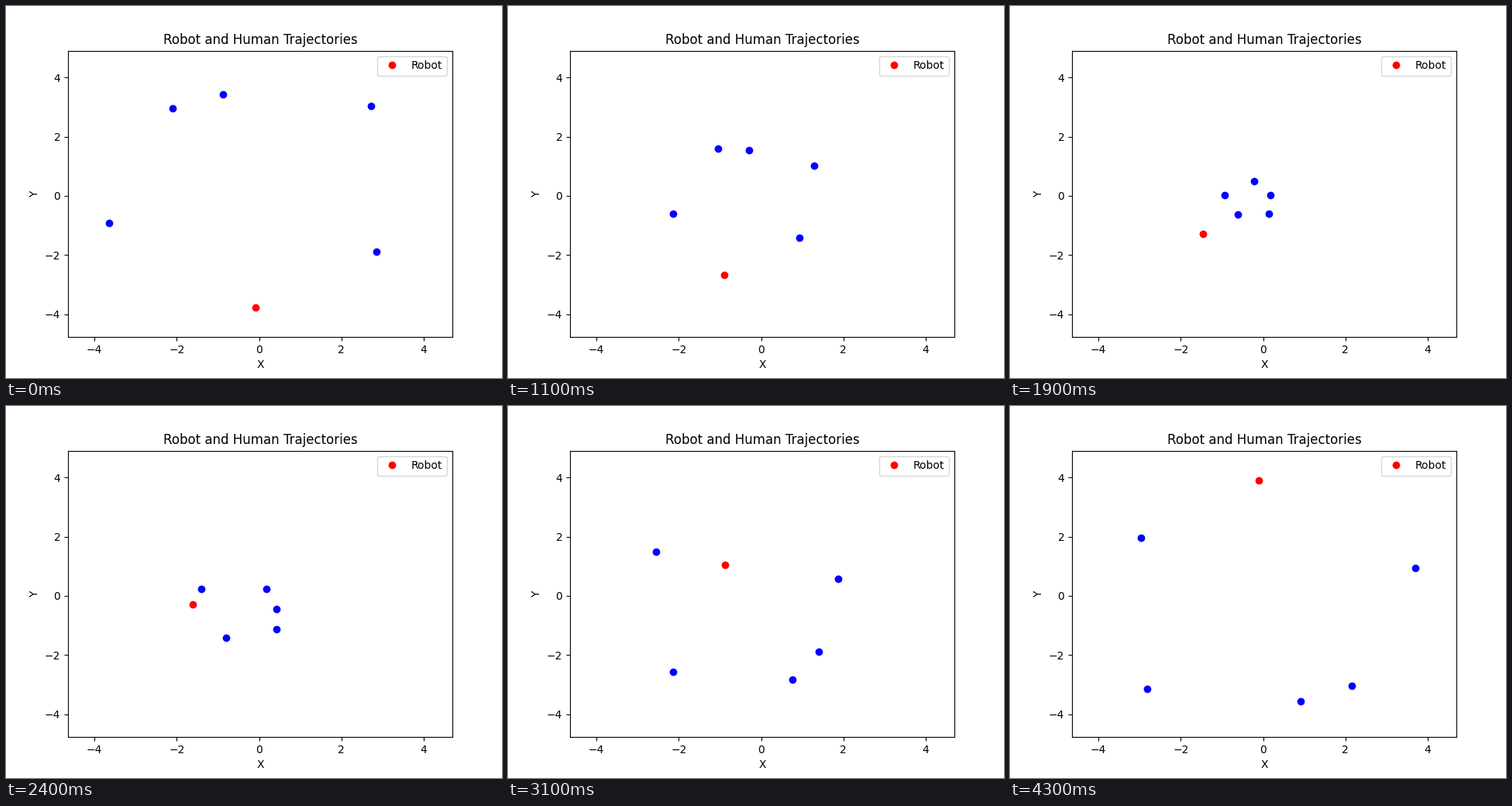
Write a matplotlib script that moves like this. It is 640x480 px and loops after 4.4 s.

```python
import numpy as np
import matplotlib.pyplot as plt
from matplotlib.animation import FuncAnimation

FRAMES = 44
STEP_MS = 100
MEET = 19          # frame at which the humans crowd together
STEP = 0.25        # full speed, in units per frame
RECOVER = 0.4      # share of lost speed regained per frame after the crowd
SAG = 0.22         # downward bow of the paths that begin in the lower half

# Each human's start and place in the crowd
HUMANS = np.array([
    [(-2.098, 2.959), (-0.215, 0.495)],
    [(-0.874, 3.431), (0.181, 0.024)],
    [(2.723, 3.038), (0.143, -0.606)],
    [(-3.642, -0.920), (-0.930, 0.024)],
    [(2.855, -1.890), (-0.610, -0.632)],
])

# Turning points of the robot: frame, x, y
ROBOT = np.array([
    (0, -0.083, -3.777), (5, -0.573, -2.624), (8, -0.836, -2.860),
    (11, -0.893, -2.676), (19, -1.458, -1.287), (23, -1.740, -0.448),
    (28, -1.062, 0.338), (43, -0.102, 3.903),
])


def robot_at(i):
    t, x, y = ROBOT.T
    return np.interp(i, t, x), np.interp(i, t, y)


def human_at(i, start, crowd):
    # steady walk into the crowd, after one frame of rest
    walk = MEET - 1
    s = np.clip((i - 1) / walk, 0, 1)
    pos = start + s * (crowd - start)
    if start[1] < 0:
        pos[1] -= SAG * np.sin(np.pi * s)

    # then on to the opposite side, slowing within one unit of the goal
    goal = -1.043 * start
    speed = np.hypot(*(crowd - start)) / walk
    for _ in range(MEET, i):
        speed += RECOVER * (STEP - speed)
        gap = goal - pos
        pos = pos + speed * gap / max(1, np.hypot(*gap))
    return pos


fig, ax = plt.subplots(figsize=(6.4, 4.8), dpi=100)
ax.set_xlim(-4.6441, 4.6968)
ax.set_ylim(-4.7759, 4.9122)
ax.set_xlabel("X")
ax.set_ylabel("Y")
ax.set_title("Robot and Human Trajectories")
robot, = ax.plot([], [], "ro", label="Robot")
humans, = ax.plot([], [], "bo")
ax.legend(loc="upper right")


def draw(i):
    x, y = robot_at(i)
    robot.set_data([x], [y])
    humans.set_data(*np.array([human_at(i, *path) for path in HUMANS]).T)
    return robot, humans


anim = FuncAnimation(fig, draw, frames=FRAMES, interval=STEP_MS,
                     init_func=lambda: draw(0), repeat=True, repeat_delay=0)
plt.show()
```
